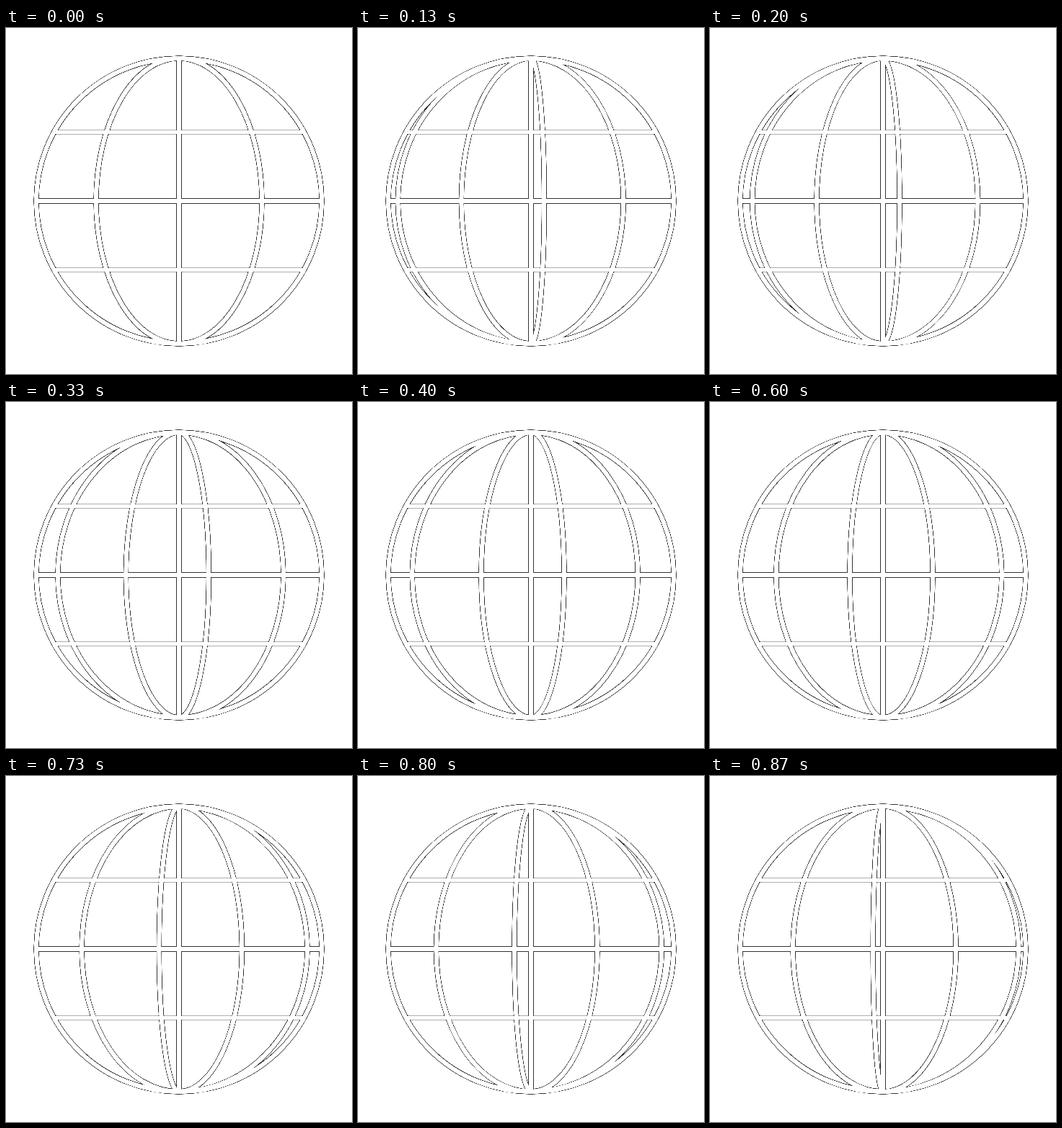
Animation, 480 px wide and 480 px high, one loop 940 ms. Source, as an HTML page with a canvas:

```html
<!DOCTYPE html>
<html lang="en">
<head>
<meta charset="utf-8">
<title>Turning globe</title>
<style>
  html, body { margin: 0; width: 100%; height: 100%; overflow: hidden; background: #fff; }
  /* High contrast drops the soft edge pixels, so curves become crisp broken hairlines. */
  canvas { display: block; filter: contrast(4) opacity(.8); }
</style>
</head>
<body>
<canvas id="stage" width="480" height="480"></canvas>
<script>
const ctx = document.getElementById('stage').getContext('2d');
const LOOP = 940;
const R = 198;        // radius to the middle of the rim
const LAT = 95.5;     // height of the upper and lower parallels
const SWING = 115;    // equator distance between inner meridians

const mix = (a, b, p) => a + (b - a) * p;

// Time steps at 15 per second, the pose advances in whole 25ths of a turn.
function progress(ms) {
  const step = Math.floor((Math.floor(ms / 10) + 0.5) * 0.15);
  return Math.ceil(step * 5 / 3) / 25;
}

function stroke(color, width, trace) {
  ctx.strokeStyle = color;
  ctx.lineWidth = width;
  ctx.beginPath();
  trace();
  ctx.stroke();
}

function line(x1, y1, x2, y2) {
  ctx.moveTo(x1, y1);
  ctx.lineTo(x2, y2);
}

function parallels() {
  const half = Math.sqrt(R * R - LAT * LAT);
  for (const y of [-LAT, LAT]) line(-half, y, half, y);
}

function axes() {
  line(0, -R, 0, R);
  line(-R, 0, R, 0);
}

function meridian(x) {
  ctx.moveTo(0, -R);
  ctx.ellipse(0, 0, Math.abs(x), R, 0, -Math.PI / 2, Math.PI / 2, x < 0);
}

function draw(ms) {
  const p = progress(ms);
  const stops = [-R, -SWING, 0, SWING, R];
  const grid = () => {
    axes();
    for (let i = 0; i < 4; i++) meridian(mix(stops[i], stops[i + 1], p));
    ctx.moveTo(R, 0);
    ctx.arc(0, 0, R, 0, Math.PI * 2);
  };

  ctx.setTransform(1, 0, 0, 1, 0, 0);
  ctx.fillStyle = '#fff';
  ctx.fillRect(0, 0, 480, 480);
  ctx.translate(240, 240);

  // Dark bands, then narrower white ones, leave the outline of the joined grid.
  stroke('#868686', 7, parallels);
  stroke('#000', 7.5, grid);
  stroke('#fff', 5, parallels);
  stroke('#fff', 6, grid);
}

function tick() {
  draw(performance.now() % LOOP);
  requestAnimationFrame(tick);
}
tick();
</script>
</body>
</html>
```
